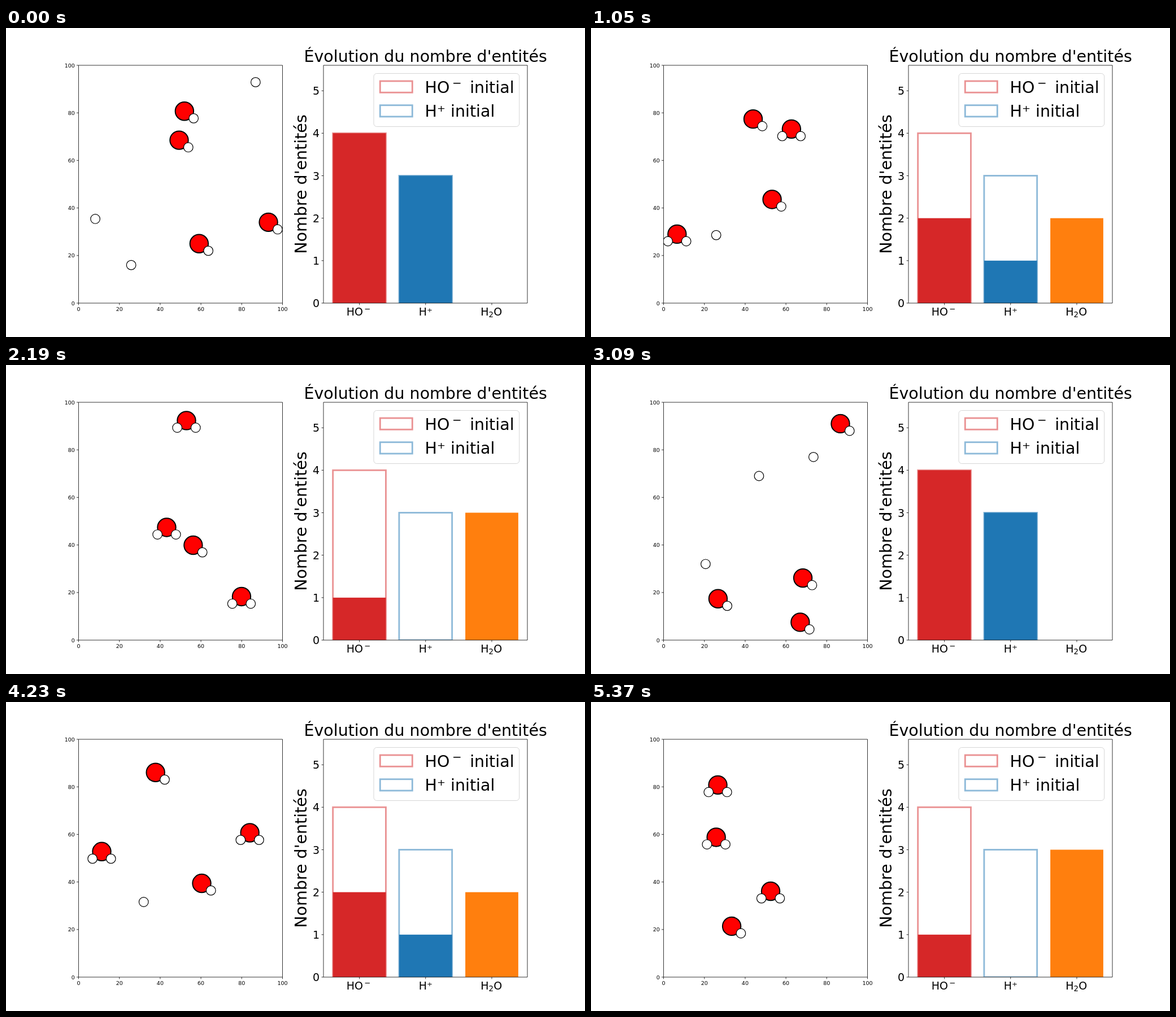
Write an HTML page that moves like this. It is 1025 px wide and 547 px high and loops after 5.4 s.

```html
<!DOCTYPE html>
<html lang="fr">
<head>
<meta charset="utf-8">
<title>Évolution du nombre d'entités</title>
<style>
  html, body { margin: 0; width: 100%; height: 100%; overflow: hidden; background: #fff; }
  svg { display: block; width: 100%; height: 100%; }
  text { font-family: "DejaVu Sans", sans-serif; fill: #000; }
</style>
</head>
<body>
<svg viewBox="0 0 1025 547">
  <defs>
    <clipPath id="boxClip"><rect x="128.5" y="66" width="361" height="421"/></clipPath>
    <clipPath id="barClip"><rect x="562" y="66" width="361" height="421"/></clipPath>
  </defs>
  <g id="particles" clip-path="url(#boxClip)"></g>
  <g id="bars" clip-path="url(#barClip)"></g>
  <g id="axes"></g>
</svg>
<script>
const STEP = 30, STEPS = 90;
const PT = 0.95, SMALL = 10 * PT, MEDIUM = 20 * PT, LARGE = 30 * PT, SUB = 0.7;
const LEFT = 128.5, RIGHT = 562, TOP = 66, W = 361, H = 421, BASE = TOP + H;
const UNIT = H / 5.6, BAR_GAP = W / 3.08, BAR_W = 0.8 * BAR_GAP;
const RED = "#d62728", BLUE = "#1f77b4", ORANGE = "#ff7f0e";

const [particles, barLayer, axes] = ["particles", "bars", "axes"].map(id => document.getElementById(id));

function add(parent, tag, attrs = {}, text = "") {
  const el = document.createElementNS("http://www.w3.org/2000/svg", tag);
  for (const k in attrs) el.setAttribute(k, attrs[k]);
  el.textContent = text;
  parent.appendChild(el);
  return el;
}
const line = d => add(axes, "path", { d, fill: "none", stroke: "#000", "stroke-width": 0.8 });
const label = (x, y, size, str, anchor = "start") =>
  add(axes, "text", { x, y, "font-size": size, "text-anchor": anchor }, str);
const outline = (parent, x, y, width, height, stroke) =>
  add(parent, "rect", { x, y, width, height, fill: "none", stroke, "stroke-opacity": 0.5, "stroke-width": 3 * PT });

const plotX = v => LEFT + v * W / 100;
const plotY = v => BASE - v * H / 100;
const barX = i => RIGHT + 0.3 + (0.54 + i) * BAR_GAP;
const barY = n => BASE - n * UNIT;

function drawAxes() {
  for (const x of [LEFT, RIGHT]) line(`M${x} ${TOP}h${W}v${H}h${-W}z`);
  for (let v = 0; v <= 100; v += 20) {
    line(`M${plotX(v)} ${BASE}v3.4M${LEFT} ${plotY(v)}h-3.4`);
    label(plotX(v), 501.4, SMALL, v, "middle");
    label(LEFT - 6.7, plotY(v) + 3.6, SMALL, v, "end");
  }
  for (let n = 0; n <= 5; n++) {
    line(`M${RIGHT} ${barY(n)}h-3.4`);
    label(RIGHT - 7, barY(n) + 7.2, MEDIUM, n, "end");
  }
  for (let i = 0; i < 3; i++) line(`M${barX(i)} ${BASE}v3.4`);

  const y = 509.2;
  label(602.7, y, MEDIUM, "HO");
  label(634, y - 7, MEDIUM * SUB, "−");
  label(barX(1), y, MEDIUM, "H⁺", "middle");
  label(840.2, y, MEDIUM, "H");
  label(854.6, y + 3.2, MEDIUM * SUB, "2");
  label(863.3, y, MEDIUM, "O");
  label(742.6, 60, LARGE, "Évolution du nombre d'entités", "middle");
  label(0, 0, LARGE, "Nombre d'entités", "middle")
    .setAttribute("transform", "translate(532 276.5) rotate(-90)");
}

function drawLegend() {
  add(axes, "rect", { x: 651, y: 80.5, width: 257.7, height: 94, rx: 5.5,
    fill: "#fff", "fill-opacity": 0.8, stroke: "#ccc", "stroke-opacity": 0.8 });
  [RED, BLUE].forEach((c, i) => outline(axes, 662.3, 94 + 42.7 * i, 57, 20.2, c));
  label(741.5, 114.5, LARGE, "HO");
  label(790, 104.2, LARGE * SUB, "−");
  label(821.2, 114.5, LARGE, "initial");
  label(741.5, 157.2, LARGE, "H⁺ initial");
}

drawAxes();
drawLegend();
[RED, BLUE].forEach((c, i) =>
  outline(barLayer, barX(i) - BAR_W / 2, barY(4 - i), BAR_W, (4 - i) * UNIT, c));
const bars = [RED, BLUE, ORANGE].map((fill, i) =>
  add(barLayer, "rect", { x: barX(i) - BAR_W / 2, width: BAR_W, fill }));

let seed = 7;
function rand() {
  seed = (seed * 16807) % 2147483647;
  return seed / 2147483647;
}
const clamp = v => Math.min(93.4, Math.max(6.6, v));

// Random walk of n steps from a to b, kept inside the box.
function walk(a, b, n) {
  const drift = [[0, 0]];
  for (let j = 1; j <= n; j++) drift.push(drift[j - 1].map(v => v + (rand() - 0.5) * 22));
  return drift.map((d, j) =>
    d.map((v, i) => clamp(a[i] + v + (b[i] - a[i] - drift[n][i]) * j / n)));
}

// Steps at which every particle passes its next key point.
const STOPS = [0, 13, 35, 66, 73, 89];
function route(points) {
  return points.slice(1).flatMap((p, i) =>
    walk(points[i], p, STOPS[i + 1] - STOPS[i]).slice(i ? 1 : 0));
}

const small = (parent, cx = 0, cy = 0) =>
  add(parent, "circle", { cx, cy, r: 8.3, fill: "#fff", stroke: "#000", "stroke-width": 1.2 });

function oxygen(...points) {
  const el = add(particles, "g");
  add(el, "circle", { r: 16.2, fill: "#f00", stroke: "#000", "stroke-width": 2 });
  small(el, 16.3, 12.6);
  return { el, path: route(points), extra: small(el, -16.3, 12.6), join: STEPS };
}

// A proton walks alone, then meets its partner at step `join`.
function proton(partner, join, ...points) {
  const path = route(points);
  partner.join = join;
  const tail = walk(points[points.length - 1], partner.path[join], join - path.length + 1);
  return { el: small(particles), path: path.concat(tail.slice(1)), join };
}

const a = oxygen([51.9, 80.7], [86.7, 91], [62.7, 73.2], [37.8, 55.5], [52.9, 92.3], [26.6, 80.8]);
const b = oxygen([49.3, 68.5], [68.3, 26.1], [43.9, 77.4], [62.3, 50], [56.2, 39.9], [33.4, 21.4]);
const c = oxygen([93.1, 34], [67, 7.5], [53.2, 43.6], [74.8, 41.3], [79.9, 18.3], [52.5, 36.1]);
const d = oxygen([59.1, 25], [26.7, 17.4], [6.6, 29], [45.7, 32.4], [43.2, 47.4], [25.8, 58.8]);
const oxygens = [a, b, c, d];
const protons = [
  proton(a, 15, [86.8, 92.9], [73.5, 77]),
  proton(d, 17, [8.2, 35.4], [20.6, 32]),
  proton(c, 68, [25.8, 16], [46.8, 69], [25.8, 28.6], [73.5, 33.3])
];

const show = (el, on) => el.setAttribute("visibility", on ? "visible" : "hidden");
function place({ el, path }, k) {
  const [x, y] = path[k];
  el.setAttribute("transform", `translate(${plotX(x)} ${plotY(y)})`);
}

function draw(ms) {
  const k = Math.floor(ms / STEP) % STEPS;
  for (const o of oxygens) {
    place(o, k);
    show(o.extra, k >= o.join);
  }
  for (const p of protons) {
    show(p.el, k < p.join);
    if (k < p.join) place(p, k);
  }
  const water = protons.filter(p => k >= p.join).length;
  [4 - water, 3 - water, water].forEach((n, i) => {
    bars[i].setAttribute("y", barY(n));
    bars[i].setAttribute("height", n * UNIT);
  });
}

const start = performance.now();
function tick() {
  draw(performance.now() - start);
  requestAnimationFrame(tick);
}
tick();
</script>
</body>
</html>
```
